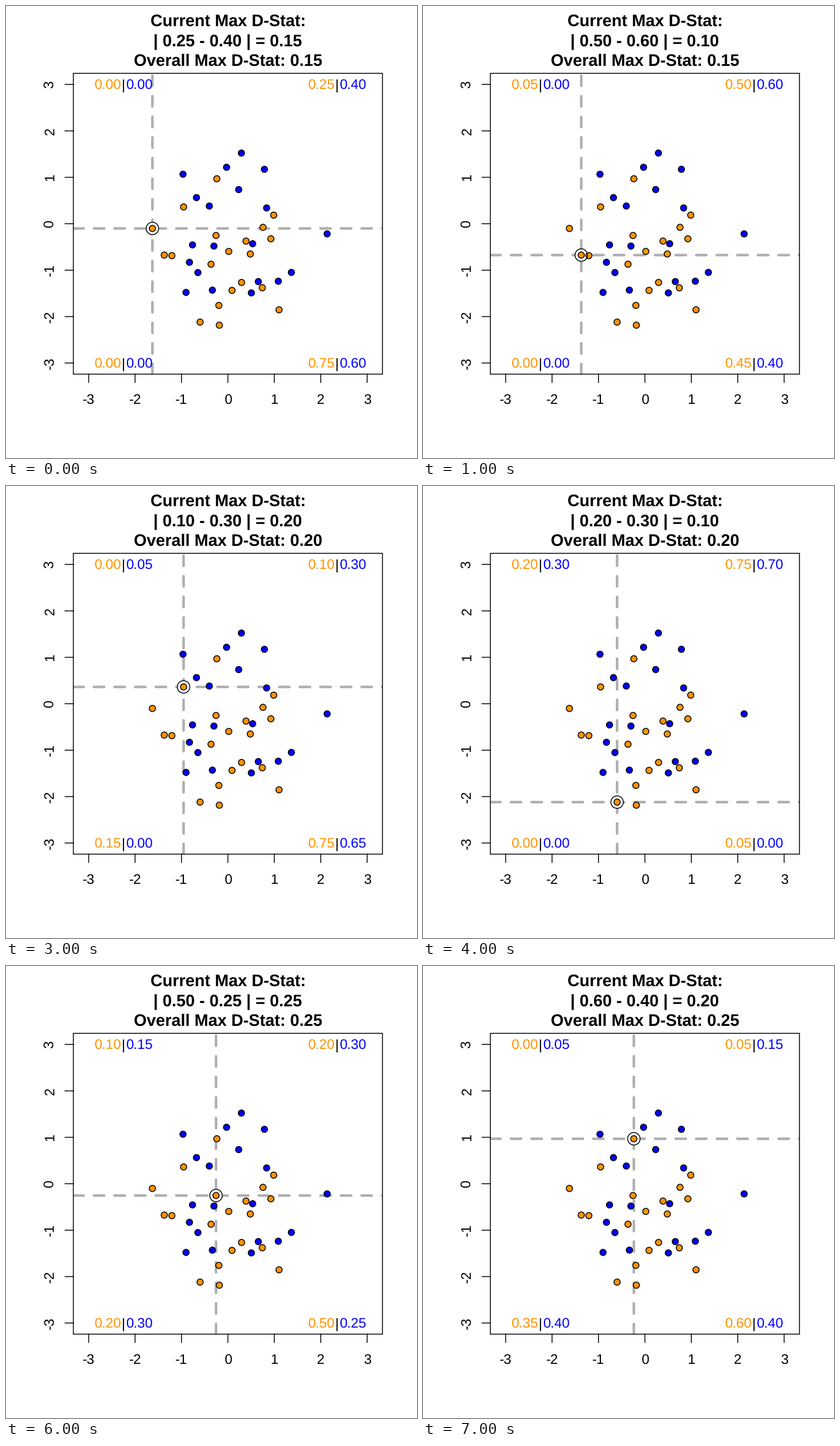
A matplotlib script that plays this animation: 714x785 px, repeating every 8 s.

```python
import math
import random

import matplotlib.pyplot as plt
import numpy as np
from matplotlib.animation import FuncAnimation
from matplotlib.patches import Circle, Rectangle

W, H, DPI = 714, 785, 72
X0, Y0, UNIT = 385.5, 378.15, 80.63
LEFT, RIGHT = X0 - 3.33 * UNIT, X0 + 3.33 * UNIT
TOP, BOTTOM = Y0 - 3.24 * UNIT, Y0 + 3.24 * UNIT
ORANGE, BLUE, GRAY = "#ff9300", "#0000ff", "#afafaf"
COUNT = 20

plt.rcParams["font.family"] = "Liberation Sans"
plt.rcParams["text.hinting"] = "none"


def twister(seed):
    """Mersenne Twister whose state is filled by a linear congruential rule."""
    words = []
    for _ in range(675):
        seed = (69069 * seed + 1) % 2**32
        words.append(seed)
    rng = random.Random(0)
    rng.setstate((3, tuple(words[-624:]) + (624,), None))
    return rng


def normals(rng, n):
    """Standard normal draws by inversion of the distribution function."""
    grid = np.linspace(-6, 6, 24001)
    cdf = [0.5 * math.erfc(-z / math.sqrt(2)) for z in grid]
    big = 2**27
    draws = []
    for _ in range(n):
        coarse = int(big * rng.getrandbits(32) / 2**32)
        draws.append((coarse + rng.getrandbits(32) / 2**32) / big)
    return np.interp(draws, cdf, grid)


def sample(rng):
    xs, ys = normals(rng, COUNT), normals(rng, COUNT)
    return np.column_stack([xs, ys])[np.argsort(xs)]


def stage(x, y):
    return X0 + x * UNIT, Y0 - y * UNIT


rng = twister(10)
orange, blue = sample(rng), sample(rng)

fig = plt.figure(figsize=(W / DPI, H / DPI), dpi=DPI, facecolor="white")
ax = fig.add_axes([0, 0, 1, 1])
ax.set_xlim(0, W)
ax.set_ylim(H, 0)
ax.axis("off")


def label(x, y, s="", size=24, **kw):
    kw = {"ha": "center", "va": "baseline", "zorder": 6, **kw}
    return ax.text(x, y, s, fontsize=size, **kw)


def stroke(xs, ys):
    ax.plot(xs, ys, color="black", lw=1.5, zorder=3, snap=False)


# Frame and axes
frame = Rectangle((LEFT, TOP), RIGHT - LEFT, BOTTOM - TOP, fill=False,
                  ec="black", lw=1.5, zorder=3, snap=False)
ax.add_patch(frame)
for v in range(-3, 4):
    x, y = stage(v, v)
    stroke([x, x], [BOTTOM, BOTTOM + 14.4])
    stroke([LEFT - 14.4, LEFT], [y, y])
    label(x, 691.3, str(v))
    label(83.3, y, str(v), rotation=90, rotation_mode="anchor")

# Crosshair and highlight
dash = dict(color=GRAY, lw=4.47, dashes=(4, 4), dash_capstyle="round",
            zorder=1, snap=False)
h_line, = ax.plot([], [], **dash)
v_line, = ax.plot([], [], **dash)
for line in (h_line, v_line):
    line.set_clip_path(frame)
disc = ax.add_patch(Circle((0, 0), 10.8, color="white", lw=0, zorder=2))
ring = ax.add_patch(Circle((0, 0), 10.8, fill=False, ec="black", lw=1.5, zorder=5))

for group, color in ((blue, BLUE), (orange, ORANGE)):
    for p in group:
        ax.add_patch(Circle(stage(*p), 5.4, fc=color, ec="black", lw=1.5, zorder=4))

titles = [label(X0, 35 + 34.5 * k, size=28.8, weight="bold") for k in range(3)]

# Quadrant read-outs: upper left, upper right, lower left, lower right
readouts = []
for y in (3, -3):
    for x in (-2.25, 2.355):
        bx, by = stage(x, y)
        by += 8.8
        label(bx, by, "|")
        readouts.append((label(bx - 27.5, by, color=ORANGE),
                         label(bx + 27, by, color=BLUE)))


def shares(group, point):
    right, up = (group >= point).T
    return [np.sum(q) / COUNT
            for q in (~right & up, right & up, ~right & ~up, right & ~up)]


def widest(point):
    """Shares of both groups, and the pair that differs most."""
    pairs = list(zip(shares(orange, point), shares(blue, point)))
    return pairs, max(pairs, key=lambda p: abs(p[0] - p[1]))


def draw(i):
    pairs, (a, b) = widest(orange[i])
    overall = max(abs(np.subtract(*widest(p)[1])) for p in orange[:i + 1])

    x, y = stage(*orange[i])
    h_line.set_data([LEFT, RIGHT], [y, y])
    v_line.set_data([x, x], [BOTTOM, TOP])
    disc.center = ring.center = (x, y)
    for (left, right), (po, pb) in zip(readouts, pairs):
        left.set_text(f"{po:.2f}")
        right.set_text(f"{pb:.2f}")
    titles[0].set_text("Current Max D-Stat:")
    titles[1].set_text(f"| {a:.2f} - {b:.2f} | = {abs(a - b):.2f}")
    titles[2].set_text(f"Overall Max D-Stat: {overall:.2f}")
    return []


anim = FuncAnimation(fig, draw, frames=8, interval=1000, repeat=True,
                     repeat_delay=0, blit=False)
plt.show()
```
